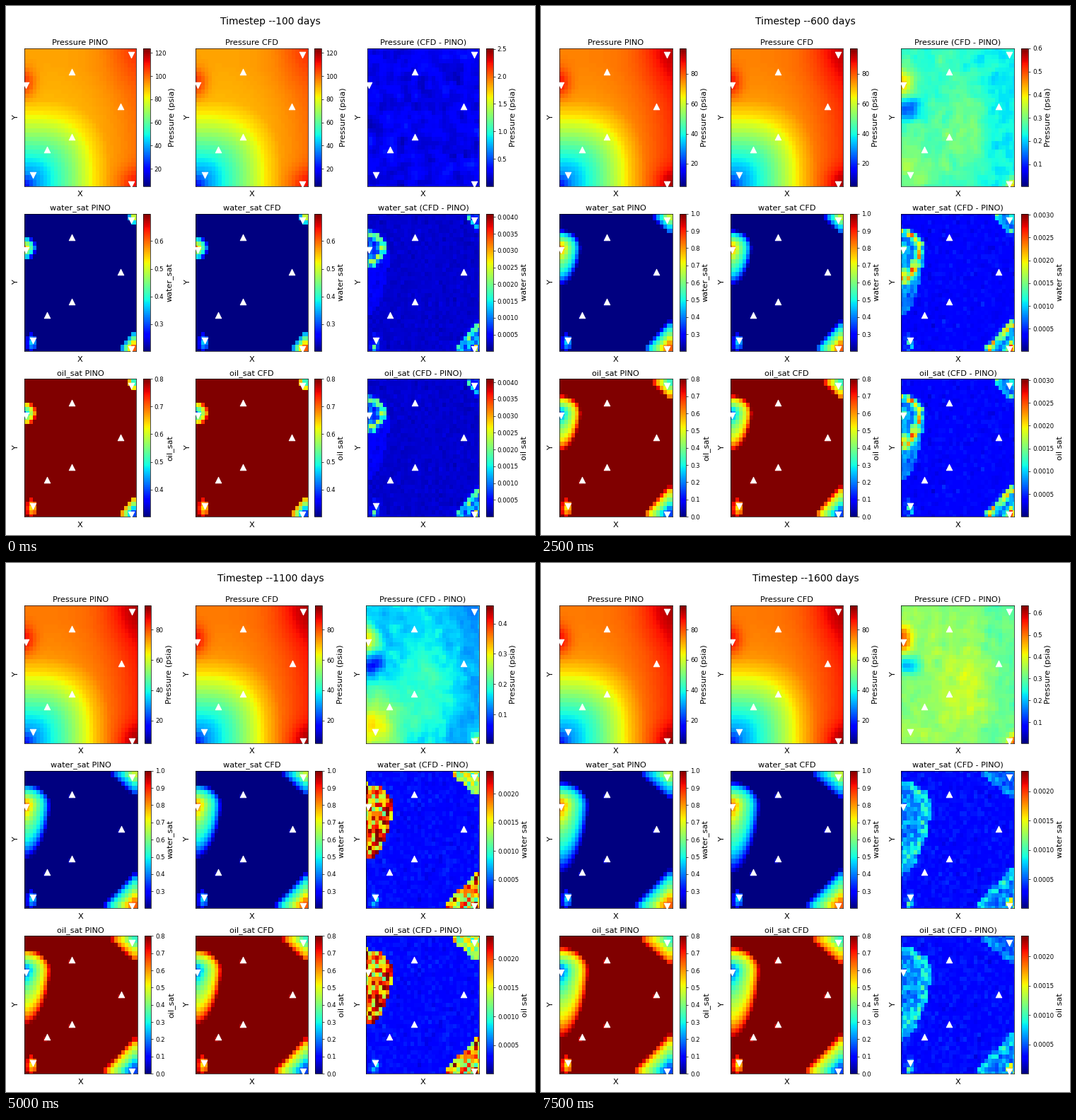
Recreate the animation shown at these times as a matplotlib script. Size 748x748 px, loop 8000 ms.

```python
import numpy as np
import matplotlib.pyplot as plt
from matplotlib.animation import FuncAnimation

N = 33
STEPS = 16
X, Y = np.meshgrid(np.arange(N), np.arange(N))
U, V = X / (N - 1), Y / (N - 1)
INJECTORS = np.array([(1, 24), (3, 3), (31, 1), (31, 31)]) - 0.5
PRODUCERS = np.array([(7, 9), (14, 12), (28, 19), (14, 27)]) - 0.5


def bump(cx, cy, sx, sy):
    return np.exp(-((X - cx) / sx) ** 2 - ((Y - cy) / sy) ** 2)


def pulse(day, mid, width):
    return np.exp(-((day - mid) / width) ** 2)


def decay(day, span):
    return np.exp(-(day - 100) / span)


def smooth(a):
    return (a + np.roll(a, 1, 0) + np.roll(a, 1, 1) + np.roll(a, (1, 1), (0, 1))) / 2


def limits(day):
    """Upper colour limits: pressure, saturation and their errors."""
    p = 96 + 28 * decay(day, 150)
    s = min(1, 0.602 + 0.00097 * day)
    pe = np.interp(day, [100, 300, 500, 700, 1100, 1300, 1600],
                   [2.51, 0.805, 0.72, 0.48, 0.46, 0.69, 0.635])
    se = np.interp(day, [100, 300, 1100, 1200, 1300, 1400],
                   [0.0041, 0.0034, 0.0024, 0.0019, 0.00185, 0.00235])
    return p, s, pe, se


def pressure(day):
    """Low around the bottom-left well, raised at the other injectors."""
    late = 1 - decay(day, 300)
    q = np.cbrt((U / 0.55) ** 3 + (V / 0.45) ** 3)
    n = np.interp(q, [0, 0.2, 0.5, 0.9, 1.15, 1.4, 2],
                  [0.1, 0.27, 0.39, 0.55, 0.655, 0.715, 0.735])
    n += 0.045 * late * np.clip(q - 0.6, 0, 1) + (0.06 + 0.04 * late) * U ** 3
    n += (0.06 + 0.03 * late) * bump(32, 32, 8, 8)
    n += 0.13 * bump(0, 24, 3, 3.2) + 0.11 * bump(32, 0, 5, 4)
    return np.clip(n, 0, 1)


def fronts(day, scale=1.0):
    """Scaled distance to the three flooded zones; 1 is the front."""
    def reach(final, power):
        return scale * final * (day / 1600) ** power

    def corner(cy, rx, ry):
        dx = np.clip(31 - X, 0, None) / rx
        dy = np.clip(np.abs(Y - cy) - 0.5, 0, None) / ry
        return dx + dy

    dy = np.abs(Y - 24)
    vert = np.where(Y > 24, (dy / reach(5.5, 0.25)) ** 2,
                    (dy / reach(16, 0.6)) ** 1.5)
    left = np.sqrt((X / reach(8.4, 0.31)) ** 2 + vert)
    low = corner(0.5, reach(9.8, 0.36), reach(8.2, 0.28))
    top = corner(31.5, reach(8, 0.6), reach(5.6, 0.38))
    return left, low, top


def flood(rho):
    q = np.clip(1 - rho, 0, 1)
    return 0.34 * np.tanh(5 * q) + 0.2 * q + 0.27 * np.exp(-(2.6 * rho) ** 2) * (q > 0)


def saturation(day):
    left, low, top = fronts(day)
    n = np.maximum(flood(left), flood(low))
    n = np.maximum(n, 0.72 * flood(top))
    spot = 0.34 * bump(2.3, 2, 1.3, 1.9)
    n = np.maximum(n, spot * (spot > 0.09))
    x, y = PRODUCERS.astype(int).T
    n[y, x] = np.maximum(n[y, x], 0.06 * day / 1600)
    return n


def pressure_error(day, rng):
    base = np.interp(day, [100, 300, 500, 700, 1100, 1600],
                     [0.1, 0.3, 0.24, 0.58, 0.34, 0.52])
    spots = 0.33 * bump(0, 24, 3, 3.2) - 0.24 * bump(1.5, 18, 3.5, 2.5)
    spots += 0.3 * np.cos(2 * np.pi * (day - 480) / 640) * bump(2, 4, 8, 8)
    spots += 0.09 * bump(18, 13, 7, 9) + 0.35 * bump(32, 0, 2, 2)
    spots -= 0.05 / (1 + np.exp((23 - X) / 1.5))
    grain = 0.02 * smooth(smooth(rng.normal(size=(N, N))) / 2 + 0.5 * rng.normal(size=(N, N)))
    return np.clip(base + (1 - decay(day, 100)) * spots + grain, 0, 1)


def saturation_error(day, rng):
    rand = rng.random((N, N))
    base = 0.13 - 0.06 * decay(day, 300)
    fill = 0.14 + 0.5 * pulse(day, 1100, 220)
    ring = 0.1 + 0.45 * pulse(day, 400, 350)
    core = 0.35 * pulse(day, 500, 150)
    n = base * (1 + 0.12 * rng.normal(size=(N, N)))

    left, low, top = fronts(day, 1 + 0.5 * decay(day, 150))
    tail = (X / 6.5) ** 2 + (np.abs(Y - 24) / 15.5) ** 1.5
    n += (0.28 * pulse(day, 400, 220) * (0.6 + 0.6 * rand)
          * ((tail < 1) & (Y < 24) & (left > 1)))
    for rho, gain in ((left, 1), (low, 0.95), (top, 0.7)):
        n += gain * fill * (0.5 + 0.8 * rand) * (rho < 1)
        n += gain * ring * (0.5 + 0.8 * rand) * np.exp(-((rho - 0.82) / 0.16) ** 2)
        n += gain * core * np.exp(-(rho / 0.3) ** 2)
    n += 0.5 * rand * (bump(2.3, 1.5, 1, 1.8) + bump(31, 1, 1.6, 1.6))
    return np.clip(n, 0, 1)


fig = plt.figure(figsize=(12, 12), dpi=62.3334)
heading = fig.suptitle("", fontsize=16)
heading.set_in_layout(False)
ROWS = [("Pressure", ["Pressure (psia)"] * 3),
        ("water_sat", ["water_sat", "water sat", "water sat"]),
        ("oil_sat", ["oil_sat", "oil sat", "oil sat"])]
meshes = []
for r, (name, labels) in enumerate(ROWS):
    for c, kind in enumerate(("PINO", "CFD", "(CFD - PINO)")):
        ax = fig.add_subplot(3, 3, 3 * r + c + 1)
        mesh = ax.pcolormesh(X, Y, np.zeros((N, N)), cmap="jet",
                             shading="nearest", vmin=0, vmax=1)
        ax.scatter(*INJECTORS.T, s=100, marker="v", color="white", zorder=3)
        ax.scatter(*PRODUCERS.T, s=100, marker="^", color="white", zorder=3)
        ax.set(xlim=(0, N - 1), ylim=(0, N - 1), xticks=[], yticks=[])
        ax.set_title(f"{name} {kind}", fontsize=13)
        ax.set_xlabel("X", fontsize=13, labelpad=7.5)
        ax.set_ylabel("Y", fontsize=13, labelpad=7.5)
        fig.colorbar(mesh, ax=ax).set_label(labels[c], fontsize=13)
        meshes.append(mesh)


def show(k, level, lo, hi):
    meshes[k].set_array(lo + level * (hi - lo))
    meshes[k].set_clim(lo, hi)


def update(i):
    day = 100 * (i + 1)
    rng = np.random.default_rng(40 + i)
    p_max, s_max, pe_max, se_max = limits(day)
    p, s = pressure(day), saturation(day)
    for c in (0, 1):
        show(c, p, 5, p_max)
        show(3 + c, s, 0.201, s_max)
        show(6 + c, 1 - s, 1 - s_max, 0.8)
    show(2, pressure_error(day, rng), 0.005, pe_max)
    error = saturation_error(day, rng)
    show(5, error, 1e-6, se_max)
    show(8, error, 1e-6, se_max)
    heading.set_text(f"Timestep --{day} days")
    fig.tight_layout(rect=(0, 0, 1, 0.95), w_pad=1.36)
    return meshes


anim = FuncAnimation(fig, update, frames=STEPS, interval=500, repeat=True)
plt.show()
```
